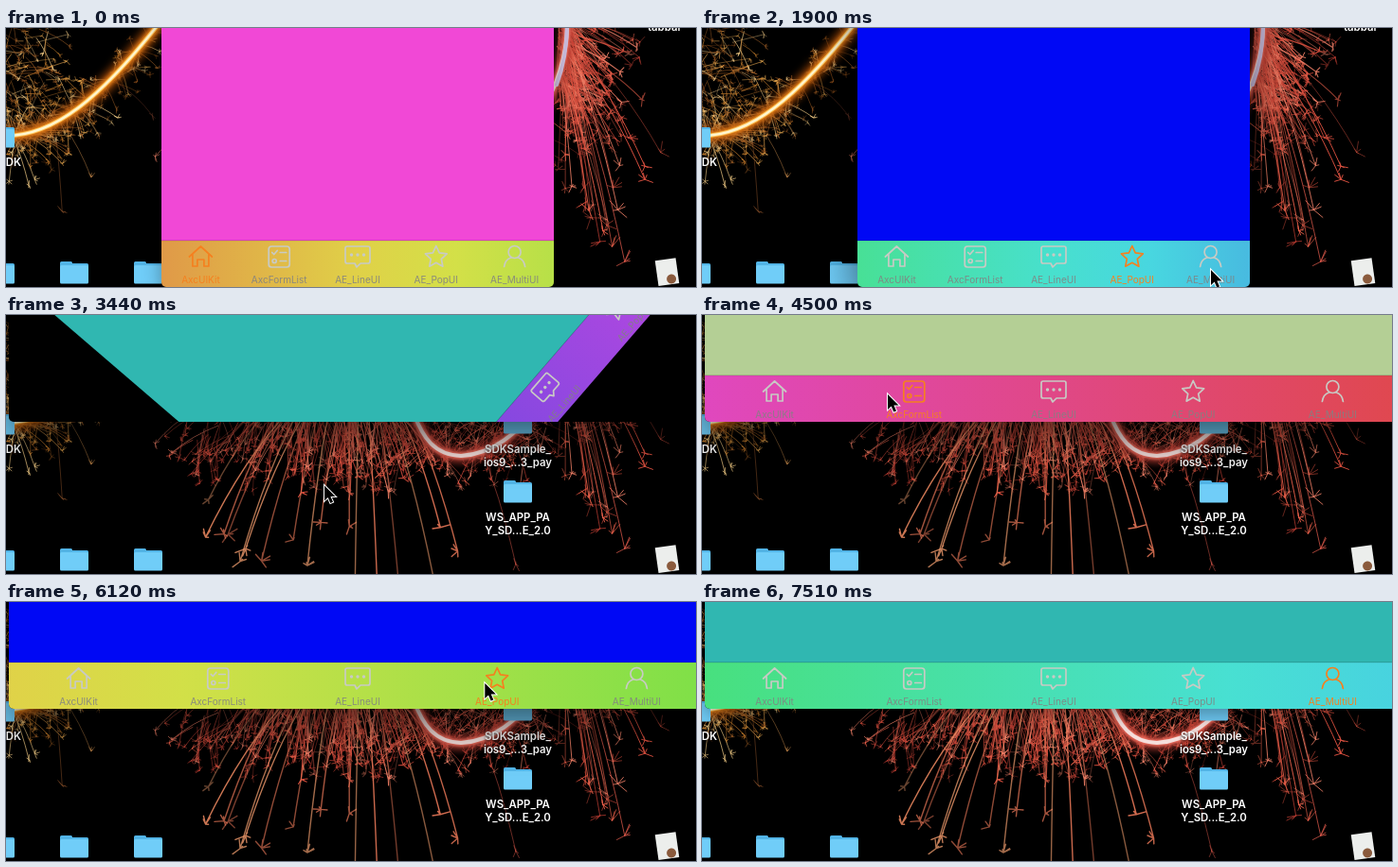
An HTML page with a canvas that plays this animation: 728x274 px, repeating every 7.61 s.

```html
<!DOCTYPE html>
<html lang="en">
<head>
<meta charset="utf-8">
<title>Rotating tab bar</title>
<style>
html, body { margin: 0; width: 728px; height: 274px; overflow: hidden; background: #000; }
canvas { display: block; }
</style>
</head>
<body>
<canvas id="stage" width="728" height="274"></canvas>
<script>
const W = 728, H = 274, LOOP = 7610;
const ctx = document.getElementById('stage').getContext('2d');
const LABEL = '"Inter", "Roboto", sans-serif';

let seed = 11;
const rand = (a = 0, b = 1) => {
  seed = (seed * 16807) % 2147483647;
  return a + (b - a) * seed / 2147483647;
};

// ---------- desktop ----------

// A falling streak that ends in a small star.
function spark(g, x, y, angle, len, color, width = 0.8) {
  const dx = Math.cos(angle) * len, dy = Math.sin(angle) * len;
  const ex = x + dx, ey = y + dy + len * 0.08;
  g.strokeStyle = color;
  g.lineWidth = width;
  g.globalAlpha = rand(0.4, 1);
  g.beginPath();
  g.moveTo(x, y);
  g.quadraticCurveTo(x + dx * 0.55, y + dy * 0.42, ex, ey);
  if (len > 14) {
    for (let i = 0; i < 5; i++) {
      const a = rand(0, 6.28), r = rand(2, 3 + len * 0.06);
      g.moveTo(ex, ey);
      g.lineTo(ex + Math.cos(a) * r, ey + Math.sin(a) * r);
    }
  }
  g.stroke();
  g.globalAlpha = 1;
}

function glow(g, path, layers) {
  g.lineCap = 'round';
  for (const [color, width, blur] of layers) {
    g.filter = blur ? `blur(${blur}px)` : 'none';
    g.strokeStyle = color;
    g.lineWidth = width;
    g.stroke(path);
  }
  g.filter = 'none';
}

function folder(g, x, y) {
  g.fillStyle = '#52b4e6';
  g.beginPath();
  g.roundRect(x, y, 13, 8, 1.5);
  g.roundRect(x, y + 2, 30, 10, 1.5);
  g.fill();
  g.fillStyle = '#70cdf8';
  g.beginPath();
  g.roundRect(x, y + 4, 30, 19.5, 1.5);
  g.fill();
}

function drawDesktop(g) {
  g.fillStyle = '#000';
  g.fillRect(0, 0, W, H);
  const gold = ['#c9802f', '#e8a850', '#8a4d1c', '#f6cf88', '#a9652a'];
  const red = ['#d9503f', '#e8604a', '#b53c31', '#f08068', '#c8483a'];
  const pick = list => list[Math.floor(rand(0, list.length))];

  // Gold trail, top left
  for (let i = 0; i < 230; i++) {
    const t = Math.pow(rand(), 1.5);
    const x = 5 + 150 * t, y = 115 - 110 * Math.pow(t, 1.7);
    spark(g, x, y, rand(0, 6.28), rand(6, 52 - 28 * t), pick(gold), 0.7);
  }
  for (let i = 0; i < 130; i++) {
    spark(g, rand(-10, 45), rand(-8, 95), rand(-0.5, 2.4), rand(6, 36), pick(gold), 0.7);
  }
  spark(g, 52, 108, 1.48, 80, '#a05f32');
  spark(g, 62, 105, 1.05, 56, '#d09050');
  spark(g, 120, 60, 0.7, 45, '#9a4f38');
  glow(g, new Path2D('M-4 114 C50 116 100 74 164 -8'), [
    ['#a64a08', 15, 5], ['#f08a1c', 7, 2], ['#ffc65c', 4.5, 0.7], ['#fff6d0', 2.3, 0]
  ]);

  // Red spray, right side
  for (let i = 0; i < 190; i++) {
    const a = rand(0.2, 1.65);
    spark(g, 588 + rand(-6, 7), rand(-25, 65), a, rand(20, 50 + 65 * rand()), pick(red), rand(0.6, 1.2));
  }
  for (let i = 0; i < 18; i++) {
    spark(g, rand(582, 598), rand(0, 50), rand(0.95, 1.5), rand(110, 185), pick(red), 1);
  }
  spark(g, 596, 10, 0.86, 145, '#c04a3c');
  spark(g, 592, 35, 1.27, 205, '#d9584a');

  // Red spray, centre
  for (let i = 0; i < 240; i++) {
    const x = rand(255, 420);
    spark(g, x, rand(80, 118), 1.57 + (340 - x) / 170 + rand(-0.5, 0.5), rand(12, 75), pick(red), rand(0.6, 1.2));
  }
  for (let i = 0; i < 180; i++) {
    spark(g, rand(410, 570), rand(90, 145), rand(0.2, 2.9), rand(8, 58), pick(red), rand(0.5, 1));
  }
  for (let i = 0; i < 30; i++) {
    spark(g, rand(185, 240), rand(100, 135), rand(1.2, 2.8), rand(12, 55), pick(red), 0.8);
  }
  for (let i = 0; i < 15; i++) {
    const x = 282 + i * 10;
    spark(g, x, 95, 2.15 - i * 0.068 + rand(-0.07, 0.07), rand(110, 190), i % 3 ? '#e97858' : '#f4a070', 1.4);
  }
  spark(g, 300, 100, 2.2, 152, '#ef8a62', 1.4);
  spark(g, 318, 100, 2.02, 150, '#f09a6c', 1.4);
  spark(g, 500, 140, 1.25, 120, '#d9584a');
  glow(g, new Path2D('M592 -8 C594 60 545 146 480 149 C452 148 440 130 430 104'), [
    ['#b93a30', 13, 4], ['#f07464', 7, 1.5], ['#f5dedb', 4, 0.4]
  ]);
  glow(g, new Path2D('M592 -4 Q592 30 581 60'), [['#cdbfe0', 4, 0.6]]);

  for (const [x, y] of [[-21, 103], [525, 102], [525, 175], [-21, 247], [57, 247], [135, 247]]) folder(g, x, y);

  // Tilted document
  g.save();
  g.translate(698, 258);
  g.rotate(-0.14);
  g.fillStyle = '#eceeec';
  g.fillRect(-11.5, -13.5, 22, 27);
  g.fillStyle = '#8a5a3c';
  g.beginPath();
  g.arc(3, 8, 5, 0, 7);
  g.fill();
  g.restore();

  g.fillStyle = '#fff';
  g.font = `600 11.4px ${LABEL}`;
  g.shadowColor = '#000';
  g.shadowBlur = 3;
  g.shadowOffsetY = 1;
  g.textAlign = 'center';
  g.fillText('SDKSample_', 540, 146);
  g.fillText('ios9_...3_pay', 540, 160);
  g.fillText('WS_APP_PA', 540, 218);
  g.fillText('Y_SD...E_2.0', 540, 232);
  g.fillText('tabbar', 695, 3);
  g.textAlign = 'right';
  g.fillText('SDK', 16, 146);
}

const desktop = document.createElement('canvas');
desktop.width = W;
desktop.height = H;
drawDesktop(desktop.getContext('2d'));

// ---------- tab bar ----------

const star = Array.from({ length: 10 }, (_, i) => {
  const a = i * Math.PI / 5, r = i % 2 ? 5.8 : 12;
  return `${r * Math.sin(a)} ${0.5 - r * Math.cos(a)}`;
}).join('L');

const tabs = [
  ['AxcUIKit', '#f148d6', 'M-12 0L0-11L12 0M-8.5-2.5V10H-3.5V3H3.5V10H8.5V-2.5'],
  ['AxcFormList', '#b4cf95', 'M-8-11H8Q11-11 11-8V8Q11 11 8 11H-8Q-11 11-11 8V-8Q-11-11-8-11ZM-7.5-4.5L-5.5-2.5L-2-6.5M1-4.5H7.5M-7 4.5a2 2 0 1 0 4 0a2 2 0 1 0-4 0M1 4.5H7.5'],
  ['AE_LineUI', '#a884c4', 'M-11-11H11Q13-11 13-9V5Q13 7 11 7H3L-1 11L-3 7H-11Q-13 7-13 5V-9Q-13-11-11-11ZM-6.5-2h.01M0-2h.01M6.5-2h.01'],
  ['AE_PopUI', '#0008f5', `M${star}Z`],
  ['AE_MultiUI', '#30b7b1', 'M-6.5-5a6.5 6.5 0 1 0 13 0a6.5 6.5 0 1 0-13 0M-11 10.5Q-10 3-4 1M11 10.5Q10 3 4 1']
].map(([name, color, d]) => ({ name, color, icon: new Path2D(d) }));
const dots = new Path2D('M-6.5-2h.01M0-2h.01M6.5-2h.01');

// [time, selected tab]
const taps = [[0, 0], [560, 1], [1080, 2], [1620, 3], [2060, 4],
  [4270, 0], [4450, 1], [5250, 2], [6020, 3], [6740, 4]];

// [time, x, y] of the pointer tip
const route = [[160, 276, 282], [430, 284, 254], [640, 287, 252], [860, 362, 250], [1200, 368, 252],
  [1540, 451, 255], [1680, 454, 256], [1900, 537, 256], [2480, 537, 256], [3100, 336, 181],
  [3700, 336, 180], [4080, 180, 124], [4220, 74, 88], [4300, 76, 86], [4500, 196, 84],
  [4820, 222, 86], [5160, 367, 86], [5560, 371, 88], [5940, 504, 86], [6240, 506, 86],
  [6640, 662, 88], [6860, 664, 90], [7240, 684, 278]];

const smooth = u => u * u * (3 - 2 * u);
const clamp = u => Math.max(0, Math.min(1, u));
const mix = (a, b, u) => a + (b - a) * u;

const TURN = 3270, CX = 371, CY = -94, SHORT = 414, LONG = 736, BAR = 49;

function drawScreen(t, w, h) {
  const selected = taps.findLast(([at]) => at <= t)[1];
  const left = -w / 2, top = h / 2 - BAR;
  ctx.fillStyle = tabs[selected].color;
  ctx.fillRect(left, -h / 2, w, h - BAR + 0.5);

  const hue = 32 + t * 0.0625;
  const fill = ctx.createLinearGradient(left, 0, -left, 0);
  for (let i = 0; i <= 4; i++) fill.addColorStop(i / 4, `hsl(${(hue + i * 11) % 360} 71% 58%)`);
  ctx.fillStyle = fill;
  ctx.fillRect(left, top, w, BAR);
  ctx.fillStyle = 'rgba(0,0,0,.25)';
  ctx.fillRect(left, top - 0.5, w, 0.7);

  ctx.font = `10px ${LABEL}`;
  ctx.textAlign = 'center';
  ctx.lineCap = ctx.lineJoin = 'round';
  tabs.forEach((tab, i) => {
    const on = i === selected;
    ctx.save();
    ctx.translate(left + w * (i + 0.5) / 5, top + 17);
    ctx.strokeStyle = on ? '#f5801f' : '#c8cac4';
    ctx.lineWidth = 1.7;
    ctx.stroke(tab.icon);
    if (i === 2) {
      ctx.lineWidth = 3.4;
      ctx.stroke(dots);
    }
    ctx.fillStyle = on ? '#f5801f' : 'rgba(130,130,130,.9)';
    ctx.fillText(tab.name, 0, 28);
    ctx.restore();
  });
}

function drawPhone(t) {
  const landscape = t >= TURN;
  const p = landscape ? smooth(clamp((t - TURN) / 365)) : 0;
  const fw = landscape ? LONG : SHORT, fh = landscape ? SHORT : LONG;
  const active = t >= 120 && t < 7400;
  ctx.save();
  ctx.translate(CX, CY);
  ctx.beginPath();
  ctx.roundRect(-fw / 2, -fh / 2, fw, fh, 5);
  ctx.shadowColor = `rgba(0,0,0,${active ? 0.6 : 0.35})`;
  ctx.shadowBlur = active ? 46 : 20;
  ctx.shadowOffsetY = active ? 16 : 6;
  ctx.fillStyle = '#000';
  ctx.fill();
  ctx.shadowColor = 'transparent';
  ctx.clip();
  if (landscape) ctx.rotate((p - 1) * Math.PI / 2);
  drawScreen(t, mix(SHORT, LONG, p), mix(LONG, SHORT, p));
  ctx.restore();
}

const arrow = new Path2D('M0 0V16L3.7 12.6L6.3 18.6L9 17.4L6.4 11.6H11.5Z');

function drawPointer(t) {
  const i = route.findIndex(([at]) => at > t);
  if (i < 1) return;
  const [t0, x0, y0] = route[i - 1], [t1, x1, y1] = route[i];
  const u = smooth((t - t0) / (t1 - t0));
  ctx.save();
  ctx.translate(mix(x0, x1, u), mix(y0, y1, u));
  ctx.lineJoin = 'miter';
  ctx.strokeStyle = '#fff';
  ctx.lineWidth = 2;
  ctx.stroke(arrow);
  ctx.fillStyle = '#000';
  ctx.fill(arrow);
  ctx.restore();
}

const start = performance.now();
function frame() {
  const t = (performance.now() - start) % LOOP;
  ctx.drawImage(desktop, 0, 0);
  drawPhone(t);
  drawPointer(t);
  requestAnimationFrame(frame);
}
frame();
</script>
</body>
</html>
```
